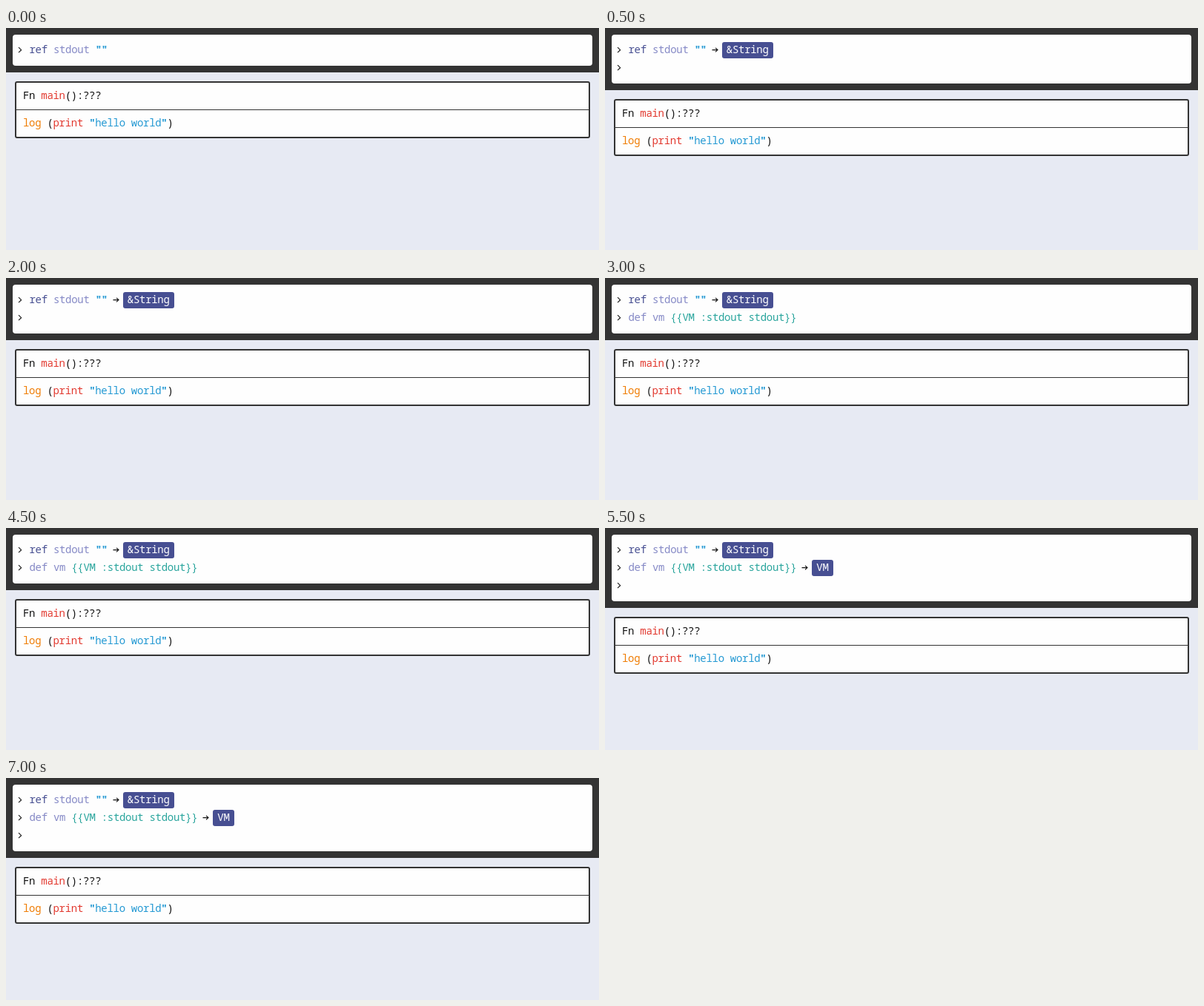
An HTML page for the animation above (8000 ms loop, 800x300 px).

```html
<!DOCTYPE html>
<html lang="en">
<head>
<meta charset="utf-8">
<title>Console session</title>
<style>
  :root {
    --dark: #333;
    --indigo: #474f92;
    --lilac: #8589c6;
    --teal: #2aa59d;
    --blue: #2499d3;
    --red: #e2392f;
    --orange: #ef7d05;
  }
  * { box-sizing: border-box; }
  html, body {
    margin: 0;
    width: 100%;
    height: 100%;
    overflow: hidden;
  }
  body {
    background: #e7eaf3;
    color: #111;
    font: 200 14px/24px "Noto Sans Mono", "Liberation Mono", monospace;
    letter-spacing: -0.3px;
  }
  b { font-weight: 600; }

  header { background: var(--dark); padding: 9px; }
  .console {
    height: 42px;
    padding: 9px 0;
    background: #fefefe;
    border-radius: 4px;
    overflow: hidden;
    animation: grow 8s step-end infinite;
  }
  .line { display: flex; height: 24px; padding-left: 6px; }
  .line svg {
    flex: none;
    height: 24px;
    fill: none;
    stroke: #111;
    stroke-width: 1.1;
  }
  .prompt { width: 16.5px; }
  .arrow { width: 21px; }
  .text { position: relative; top: -1px; white-space: pre; }
  .result { display: flex; }
  .pill {
    height: 22px;
    margin-top: 1px;
    padding: 0 6px;
    line-height: 20px;
    background: var(--indigo);
    color: #fff;
    border-radius: 3px;
  }

  .first  { animation: first 8s step-end infinite; }
  .second { animation: second 8s step-end infinite; }
  .third  { animation: third 8s step-end infinite; }

  .panel {
    margin: 12px 12px 0;
    background: #fefefe;
    border: 2px solid var(--dark);
    border-radius: 3px;
  }
  .row { height: 36px; padding-left: 9px; line-height: 36px; }
  .row + .row { height: 37px; border-top: 1px solid var(--dark); }

  .indigo { color: var(--indigo); }
  .lilac { color: var(--lilac); }
  .teal { color: var(--teal); }
  .blue { color: var(--blue); }
  .red { color: var(--red); }
  .orange { color: var(--orange); }

  @keyframes grow {
    0% { height: 42px; }
    6.25% { height: 66px; }
    68.75%, 100% { height: 90px; }
  }
  @keyframes first {
    0% { visibility: hidden; }
    6.25%, 100% { visibility: visible; }
  }
  @keyframes second {
    0% { visibility: hidden; }
    37.5%, 100% { visibility: visible; }
  }
  @keyframes third {
    0% { visibility: hidden; }
    68.75%, 100% { visibility: visible; }
  }
</style>
</head>
<body>
<svg width="0" height="0" style="position:absolute">
  <symbol id="chevron" viewBox="0 0 16.5 24"><path d="M2 8.2 5.6 11.7 2 15.2"/></symbol>
  <symbol id="arrow" viewBox="0 0 21 24"><path d="M7.5 11.6H15M12 8.8 15 11.6 12 14.4"/></symbol>
</svg>
<header>
  <div class="console">
    <div class="line">
      <svg class="prompt"><use href="#chevron"/></svg>
      <span class="text"><span class="indigo">ref</span> <span class="lilac">stdout</span> <b class="blue">""</b></span>
      <div class="result first">
        <svg class="arrow"><use href="#arrow"/></svg>
        <span class="pill">&amp;String</span>
      </div>
    </div>
    <div class="line">
      <svg class="prompt first"><use href="#chevron"/></svg>
      <span class="text second"><span class="lilac">def vm</span> <span class="teal">{{VM :stdout stdout}}</span></span>
      <div class="result third">
        <svg class="arrow"><use href="#arrow"/></svg>
        <span class="pill">VM</span>
      </div>
    </div>
    <div class="line">
      <svg class="prompt third"><use href="#chevron"/></svg>
    </div>
  </div>
</header>
<main class="panel">
  <div class="row"><span class="text">Fn <span class="red">main</span>():???</span></div>
  <div class="row"><span class="text"><span class="orange">log</span> (<span class="red">print</span> <span class="blue"><b>"</b>hello world<b>"</b></span>)</span></div>
</main>
</body>
</html>
```
